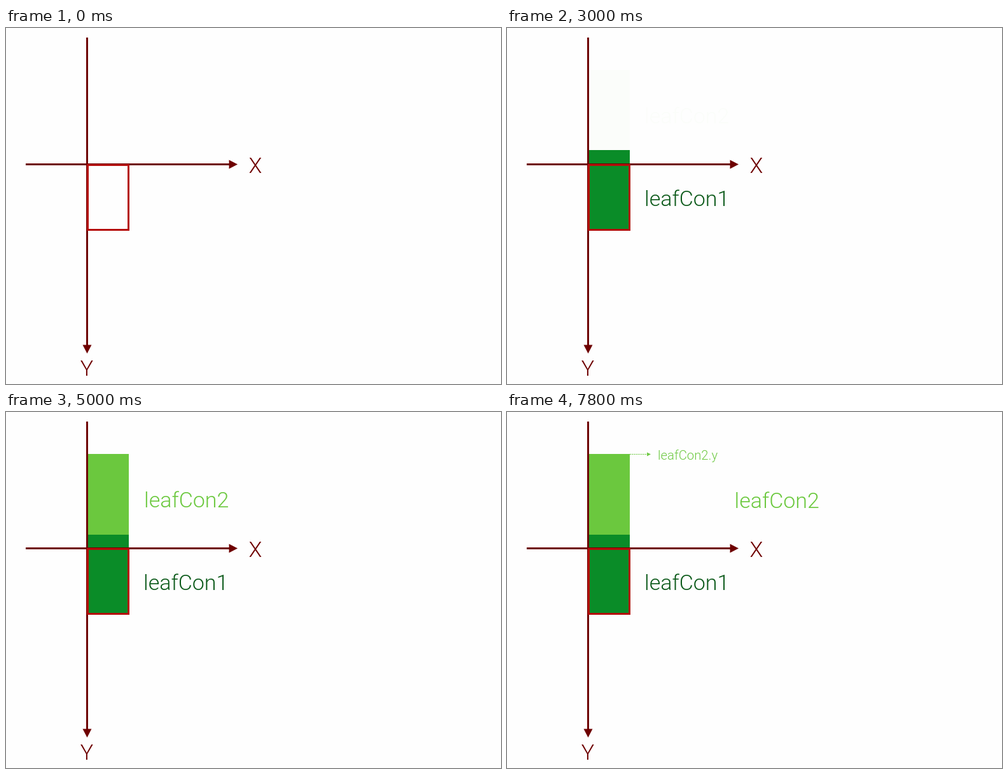
Write an HTML page that moves like this. It is 778 by 560 pixels and loops after 8 s.

```html
<!DOCTYPE html>
<html lang="en">
<head>
<meta charset="utf-8">
<title>Stacked leaf containers</title>
<style>
  html, body { margin: 0; width: 100%; height: 100%; overflow: hidden; background: #fefefe; }
  svg { display: block; width: 778px; height: 560px; }
  text { font: 300 34px Roboto, "Liberation Sans", sans-serif; }
  .axis { stroke: #6e0000; stroke-width: 3; }
  .head, .name { fill: #6e0000; }
  .name { text-anchor: middle; }
  .frame { fill: none; stroke: #b50d0b; stroke-width: 3; }
  .leaf1 { fill: #0a8c28; }
  .leaf2, .note { fill: #6bc83e; }
  .label1 { fill: #0c5a1a; }
  .note text { font-size: 20.3px; }
  .dots { stroke: #6bc83e; stroke-dasharray: 2 1; }

  /* The picture advances five times a second: 2.5% is one step. */
  .first, .second, .slide, .leaf2, .note { animation: 8s step-end infinite; }
  .first { animation-name: first; }
  .second { animation-name: second; }
  .slide { animation-name: slide; }
  .leaf2 { animation-name: settle; }
  .note { animation-name: note; }

  @keyframes first {
    0% { opacity: 0; }
    15% { opacity: .17; }
    17.5% { opacity: .45; }
    20% { opacity: .75; }
    22.5% { opacity: .95; }
    25%, 100% { opacity: 1; }
  }
  @keyframes second {
    0% { opacity: 0; }
    37.5% { opacity: .02; }
    40% { opacity: .19; }
    42.5% { opacity: .48; }
    45% { opacity: .77; }
    47.5% { opacity: .96; }
    50%, 100% { opacity: 1; }
  }
  @keyframes slide {
    0% { transform: none; }
    62.5% { transform: translate(1px, 0); }
    65% { transform: translate(24px, 0); }
    67.5% { transform: translate(64px, .5px); }
    70% { transform: translate(107px, 1px); }
    72.5% { transform: translate(136px, 1px); }
    75%, 100% { transform: translate(141.5px, 1px); }
  }
  @keyframes settle {
    0% { height: 126px; }
    62.5%, 100% { height: 127px; }
  }
  @keyframes note {
    0% { opacity: 0; }
    87.5% { opacity: .03; }
    90% { opacity: .2; }
    92.5% { opacity: .5; }
    95% { opacity: .79; }
    97.5%, 100% { opacity: .97; }
  }
</style>
</head>
<body>
<svg viewBox="0 0 778 560">
  <g class="first">
    <rect class="leaf1" x="128" y="192" width="65" height="127"/>
    <text class="label1" x="216" y="279.5">leafCon1</text>
  </g>
  <g class="second">
    <rect class="leaf2" x="128" y="66" width="65" height="126"/>
    <g class="slide"><text x="216" y="149.5" fill="#6bc83e">leafCon2</text></g>
  </g>

  <path class="axis" d="M127.5 15V500M31 214.5H352"/>
  <path class="head" d="M350.5 207.5L364 214.5L350.5 221.5ZM120.5 498.5H134.5L127.5 512Z"/>
  <text class="name" x="392" y="227.5">X</text>
  <text class="name" x="127" y="547">Y</text>
  <rect class="frame" x="128.5" y="215.5" width="64" height="102"/>

  <g class="note">
    <path class="dots" d="M193 66.5H220"/>
    <path d="M220 63.5L226 66.5L220 69.5Z"/>
    <text x="237" y="74.5">leafCon2.y</text>
  </g>
</svg>
</body>
</html>
```
